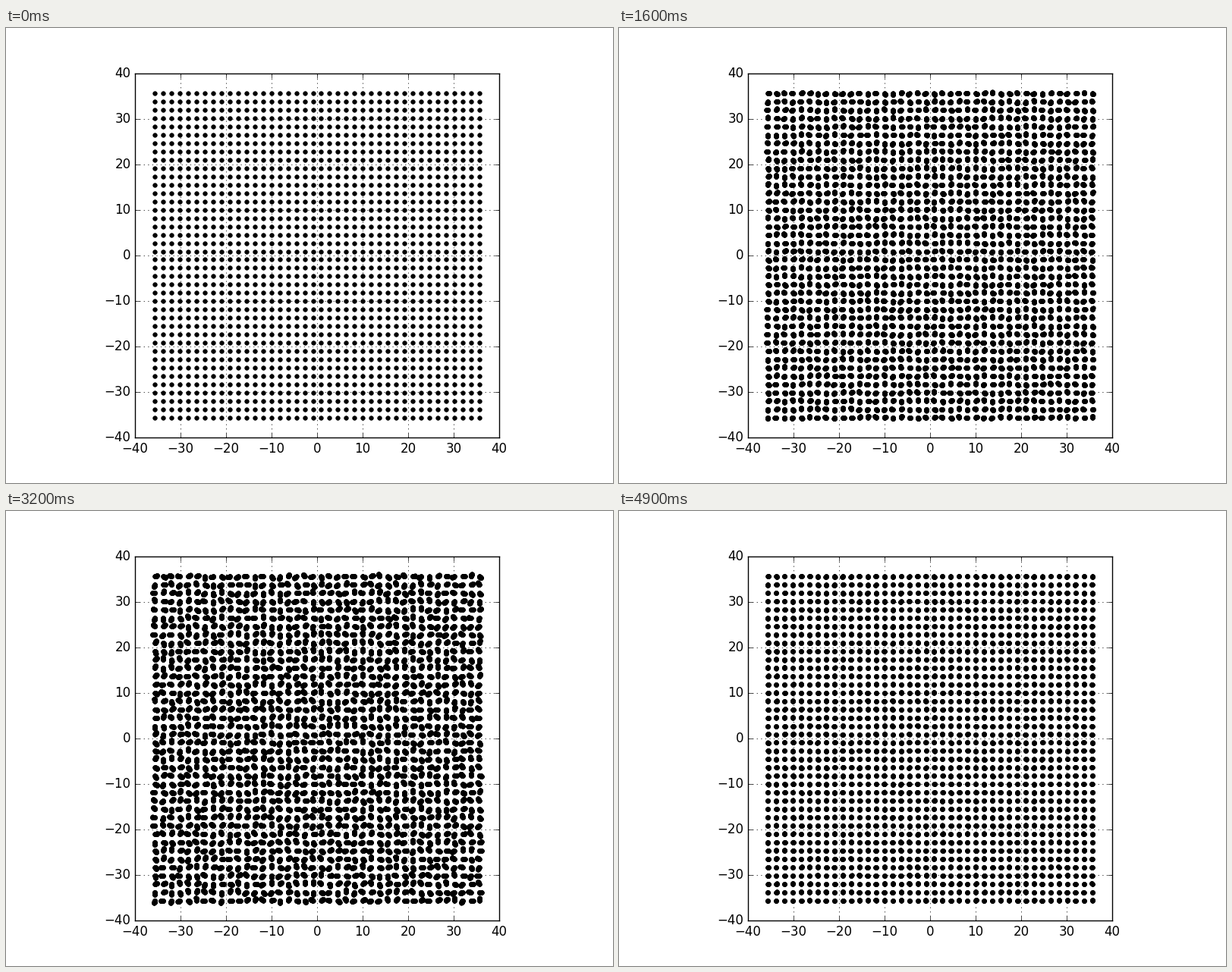
A matplotlib script that plays this animation: 800 by 600 pixels, repeating every 5000 ms.

```python
import numpy as np
import matplotlib.pyplot as plt
from matplotlib.animation import FuncAnimation

SIDE = 40
DENSITY = 0.3
DT = 0.01
STEPS = 50
SPACING = 1 / np.sqrt(DENSITY)
BOX = SIDE * SPACING


def uniform_numbers(count, seed=17):
    """Linear congruential generator on [0, 1)."""
    values = []
    for _ in range(count):
        seed = (seed * 314159269 + 453806245) & 0x7FFFFFFF
        values.append(seed / 2**31)
    return np.array(values)


def accelerations(pos):
    """Soft-disk repulsion between neighbouring cells of a periodic box."""
    acc = np.zeros_like(pos)
    for dy in (-1, 0, 1):
        for dx in (-1, 0, 1):
            if dx == dy == 0:
                continue
            delta = pos - np.roll(pos, (dy, dx), axis=(0, 1))
            delta -= BOX * np.round(delta / BOX)
            r2 = (delta**2).sum(axis=-1, keepdims=True)
            inv6 = r2**-3
            force = 48 * inv6 * (inv6 - 0.5) / r2
            acc += np.where(r2 < 2 ** (1 / 3), force, 0) * delta
    return acc


def simulate():
    axis = (np.arange(SIDE) - (SIDE - 1) / 2) * SPACING
    pos = np.stack(np.meshgrid(axis, axis), axis=-1)
    angle = 2 * np.pi * uniform_numbers(SIDE**2).reshape(SIDE, SIDE)
    speed = np.sqrt(2 * (1 - 1 / SIDE**2))
    vel = speed * np.stack([np.cos(angle), np.sin(angle)], axis=-1)
    vel -= vel.mean(axis=(0, 1))

    history = [pos.copy()]
    acc = accelerations(pos)
    for _ in range(STEPS - 1):
        vel += acc * DT / 2
        pos = pos + vel * DT
        acc = accelerations(pos)
        vel += acc * DT / 2
        history.append(pos)
    return np.array(history)


plt.style.use("classic")
plt.rcParams.update({
    "font.family": "DejaVu Sans",
    "figure.facecolor": "white",
    "savefig.facecolor": "white",
    "figure.dpi": 100,
    "savefig.dpi": 100,
})

history = simulate()
# Steps play in the alphabetical order of their numbers: 1, 10, 11, ... 2, 20 ...
play_order = sorted(range(1, STEPS + 1), key=str)

fig = plt.figure(figsize=(8, 6), dpi=100)
ax = fig.add_axes([0.125, 0.1, 0.775, 0.8])
ax.set_aspect("equal")
ax.set_xlim(-40, 40)
ax.set_ylim(-40, 40)
ax.grid(True)
dots, = ax.plot([], [], "ko", markersize=4)


def update(frame):
    trail = history[:play_order[frame]].reshape(-1, 2)
    dots.set_data(trail[:, 0], trail[:, 1])
    return dots,


anim = FuncAnimation(fig, update, frames=STEPS, interval=100,
                     repeat=True, repeat_delay=0, blit=False)
plt.show()
```
